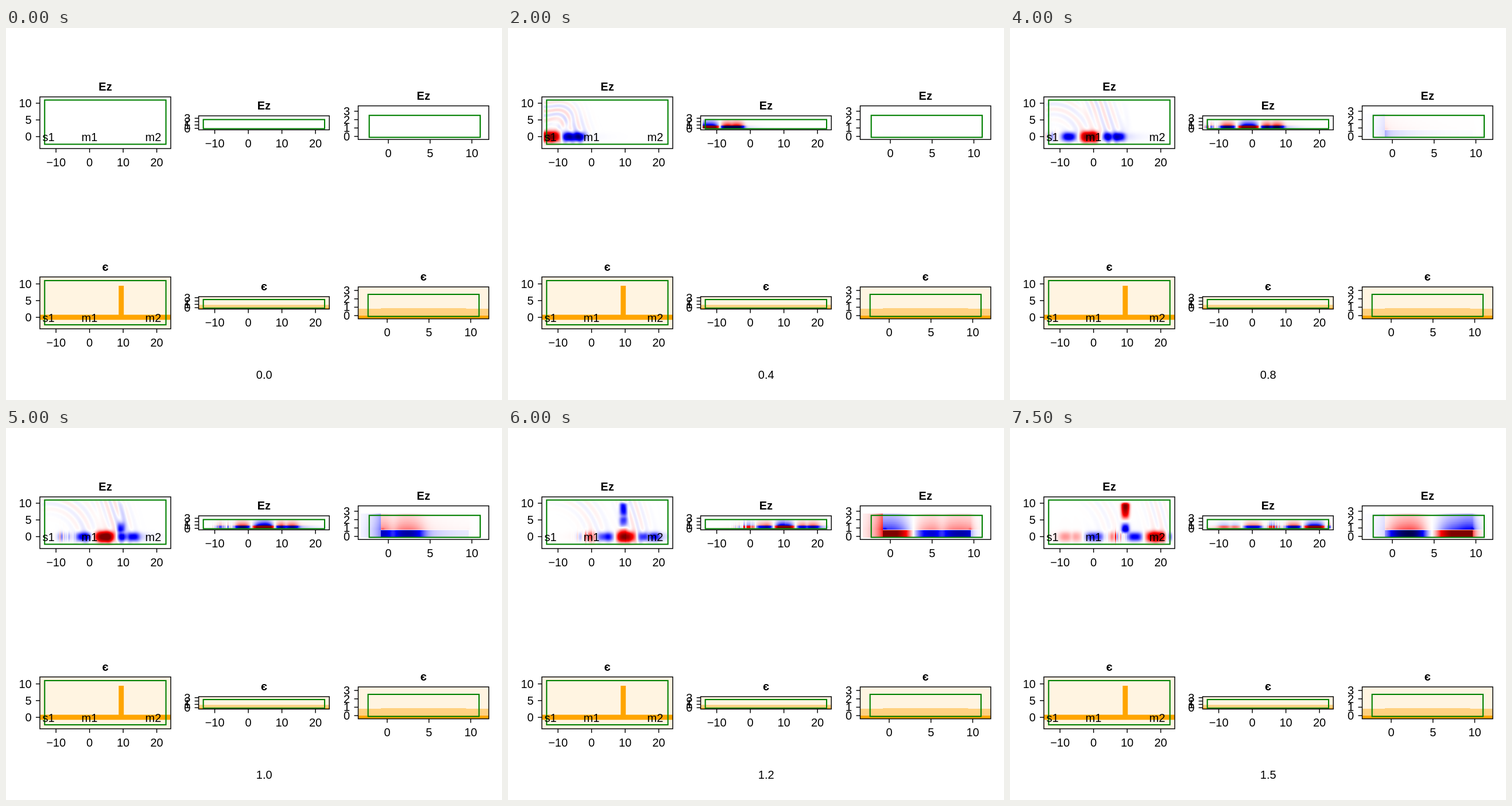
Recreate the animation shown at these times as an HTML page with a canvas. Size 864 by 648 pixels, loop 8 s.

```html
<!DOCTYPE html>
<html lang="en">
<head>
<meta charset="utf-8">
<title>Field simulation</title>
<style>
  html, body { margin: 0; width: 100%; height: 100%; overflow: hidden; background: #fff; }
  canvas, svg { position: absolute; left: 0; top: 0; }
  text { font: 20px "Liberation Sans", Arial, sans-serif; text-anchor: middle; }
  .title { font-weight: bold; }
  .ytick { text-anchor: end; }
  .axis { fill: none; stroke: #000; stroke-width: 1.45; }
  .domain { fill: none; stroke: #008000; stroke-width: 2.1; }
</style>
</head>
<body>
<canvas id="field" width="864" height="648"></canvas>
<svg id="plot" width="864" height="648" viewBox="0 0 864 648"></svg>
<script>
const STEP = 500, STEPS = 16;
const svg = document.getElementById('plot');
const ctx = document.getElementById('field').getContext('2d');

// ---------- axes ----------
function add(tag, attrs, text) {
  const el = document.createElementNS('http://www.w3.org/2000/svg', tag);
  for (const k in attrs) el.setAttribute(k, attrs[k]);
  if (text !== undefined) el.textContent = text;
  svg.appendChild(el);
  return el;
}
const rect = (l, t, r, b, attrs) =>
  add('rect', { x: l, y: t, width: r - l, height: b - t, ...attrs });
const label = (x, y, text, cls = '') => add('text', { x, y, class: cls }, text);

const CREAM = '#fff4e1', AMBER = '#ffd180', ORANGE = '#ffa500';

// frame and domain are [left, top, right, bottom]; xs and ys are {origin, scale, ticks}
function panel({ frame, domain, title, xs, ys, marks, layers = [] }) {
  const [l, t, r, b] = frame;
  for (const [fill, ...box] of layers) rect(...box, { fill });
  rect(...domain, { class: 'domain' });
  if (marks !== undefined) {
    label(74, marks, 's1');
    label(145.5, marks, 'm1');
    label(256.5, marks, 'm2');
  }
  rect(...frame, { class: 'axis' });
  for (const v of xs.ticks) {
    const x = xs.origin + v * xs.scale;
    add('path', { d: `M${x} ${b}v7`, class: 'axis' });
    label(x, b + 30.8, String(v).replace('-', '\u2212'));
  }
  for (const v of ys.ticks) {
    const y = ys.origin - v * ys.scale;
    add('path', { d: `M${l} ${y}h-7`, class: 'axis' });
    label(l - 14.3, y + 7, v, 'ytick');
  }
  label((l + r) / 2, t - 11, title, 'title');
}

const axis = (origin, scale, ...ticks) => ({ origin, scale, ticks });
const longX = origin => axis(origin, 5.85, -10, 0, 10, 20);
const sideX = origin => axis(origin, 14.55, 0, 5, 10);
const topY = origin => axis(origin, 5.83, 0, 5, 10);
const height = (origin, scale) => axis(origin, scale, 0, 1, 2, 3);

panel({ frame: [59, 120, 287, 210], domain: [67.3, 125.5, 278.6, 202.5], title: 'Ez',
  xs: longX(145.6), ys: topY(189.3), marks: 197 });
panel({ frame: [335.6, 153, 563.2, 177.4], domain: [343.7, 159.5, 555, 175.5], title: 'Ez',
  xs: longX(422.1), ys: height(174.8, 5.85) });
panel({ frame: [613.5, 135.6, 841, 194.2], domain: [632.7, 152.2, 826, 190.5], title: 'Ez',
  xs: sideX(666), ys: height(188.8, 14.6) });

panel({ frame: [59, 433.6, 287, 524], domain: [67.3, 440, 278.6, 517], title: '\u0454',
  xs: longX(145.6), ys: topY(504), marks: 511.5,
  layers: [[CREAM, 59, 433.6, 287, 524], [ORANGE, 59, 499.5, 287, 508.3],
           [ORANGE, 196.3, 449, 205.2, 504]] });
panel({ frame: [335.6, 468, 563.2, 489.6], domain: [343.7, 473, 555, 488], title: '\u0454',
  xs: longX(422.1), ys: height(487.3, 5.85),
  layers: [[CREAM, 335.6, 468, 563.2, 489.6], [AMBER, 335.6, 482.3, 563.2, 489.6],
           [ORANGE, 335.6, 487.5, 563.2, 489.6]] });
panel({ frame: [613.5, 451, 841, 506.6], domain: [630.7, 464, 824, 502.5], title: '\u0454',
  xs: sideX(664), ys: height(501, 14.6),
  layers: [[CREAM, 613.5, 451, 841, 506.6], [AMBER, 613.5, 489, 841, 506.6],
           [AMBER, 653, 488, 801.5, 490], [ORANGE, 613.5, 501, 841, 506.6]] });

const clock = label(449.7, 611, '0.0');

// ---------- field ----------
const { exp, abs, min, max, sin, hypot } = Math;
const SPEED = 164, SOURCE = 67, STUB = 200.5, AXIS = 189;
const clamp = v => max(0, min(1, v));
const smooth = (a, b, x) => { const u = clamp((x - a) / (b - a)); return u * u * (3 - 2 * u); };
const bell = (d, w, p = 2) => exp(-(abs(d / w) ** p));
const hash = n => { const s = sin(n * 12.9898) * 43758.5453; return 2 * (s - Math.floor(s)) - 1; };

// blue, red, blue packet travelling along the guide; q is the distance from its origin
function packet(q, t) {
  const lead = (0.95 - 0.35 * t) * bell(q - 48, 19, 4) *
    (1 - 0.4 * min(1, t) * bell(q - 47, 4));
  const tail = q > 50 ? 0.3 * min(1, t) * exp((50 - q) / 20) * smooth(50, 68, q) : 0;
  return bell(q - 7.6, 15.5, 3) - lead - tail - 0.6 * bell(q + 29, 12.5, 3);
}

function guide(x, t) {
  if (x < 62) return 0;
  const front = SPEED * t, q = x - front;
  let v = packet(q, t) * (x > 205 ? 0.85 : 1);
  if (t > 0.45) v *= smooth(61, 82, x);
  if (x < STUB) v -= 0.42 * smooth(200, 168, x) * packet(400 - x - front, t);
  if (t > 0.45) {
    v += 0.3 * hash(Math.floor(x / 1.5)) * bell(q + 63, 13);
    v += 0.3 * hash(Math.floor(x) + 40) * bell(x - 74, 9) * bell(t - 0.6, 0.12);
  }
  return v * min(1, t / 0.25) * smooth(284, 279, x);
}

// u is the distance up the side arm, with a bounce at its end
function arm(u, t) {
  const q = 208 + u - SPEED * t;
  return (0.8 * packet(q, t) + 0.45 * packet(q + 110 - 2 * u, t)) * min(1, t / 0.25);
}

function ripples(x, y, t) {
  const r = hypot(x - SOURCE, y - AXIS), edge = 130 * t;
  if (t < 0.25) return 0;
  const angle = Math.atan2(AXIS - y, x - SOURCE);
  const fade = t > 1 ? max(0.35, 2 - t) : 1;
  return fade * (0.06 * sin(r / 2.4 + 2 * sin(angle * 5)) * bell(r - edge, 22) +
    0.035 * sin(r / 3 + angle * 3) * bell(r - edge * 0.55, 24));
}

function topView(t) {
  const along = memo(x => guide(x, t)), up = memo(y => arm(AXIS - y, t));
  return (x, y) => {
    const dy = y - AXIS, u = -dy, f = along(x);
    if (y < 124 || x < 62) return 0;
    let v = f * bell(dy, f > 0 ? 8.6 : 7.4, 2.4) + 0.035 * f * exp(-abs(dy) / 18);
    if (u > 0) {
      const h = bell(x - STUB, 6.6, 2.6) * smooth(62, 55, u);
      v = v * (1 - h * smooth(4, 14, u)) + up(y) * h * smooth(3, 13, u);
    }
    return v + ripples(x, y, t) * smooth(204, 201, y);
  };
}

function lengthView(t) {
  const along = memo(x => guide(x - 276.5, t));
  return (x, y) => {
    const f = along(x);
    if (y >= 175) return 0;
    return y >= 170 ? 1.5 * f : -0.65 * f * exp((y - 169) / 5.5) * smooth(156, 161, y);
  };
}

function armView(t) {
  const up = memo(x => arm((x - 666) * 0.4, t));
  const L = 653, R = 805, CORE = 177;
  return (x, y) => {
    if (x < 618 || x > 830) return 0;
    const row = Math.floor((y - 149) / 3) * 3 + 149;
    const decay = exp((row - CORE) / 22);
    const spot = bell(hypot(x - L - 3, y - CORE), 3) + bell(hypot(x - R, y - CORE), 3);
    if (x < L) return 0.65 * up(L) * exp((x - L) / 15) * (y < CORE ? 0.5 + 0.5 * decay : 0.9);
    const edge = x > R ? exp((R - x) / 7) : 1;
    const s = up(min(x, R));
    if (y === CORE) return 0.15 * s * edge;
    if (y > CORE) return 1.45 * s * (x > R ? 0.3 * edge : 1);
    return (-0.55 * s * decay - 0.3 * s * spot) * edge;
  };
}

function memo(fn) {
  const seen = new Map();
  return k => {
    if (!seen.has(k)) seen.set(k, fn(k));
    return seen.get(k);
  };
}

// dark blue, blue, white, red, dark red
function colour(v) {
  const m = min(1, abs(v)), pale = 255 * (1 - min(1, m * 2)), over = max(0, m * 2 - 1);
  return v > 0 ? [255 - 127 * over, pale, pale] : [pale, pale, 255 - 178 * over];
}

function paint(left, top, right, bottom, value) {
  const w = right - left, img = ctx.createImageData(w, bottom - top);
  for (let i = 0; i < img.data.length; i += 4) {
    const n = i / 4;
    img.data.set([...colour(value(left + n % w, top + Math.floor(n / w))), 255], i);
  }
  ctx.putImageData(img, left, top);
}

let shown = -1;
function tick() {
  const step = Math.floor(performance.now() / STEP) % STEPS;
  if (step !== shown) {
    shown = step;
    const t = step / 10;
    clock.textContent = t.toFixed(1);
    paint(60, 121, 286, 206, topView(t));
    paint(337, 154, 562, 177, lengthView(t));
    paint(615, 149, 840, 191, armView(t));
  }
  requestAnimationFrame(tick);
}
tick();
</script>
</body>
</html>
```
